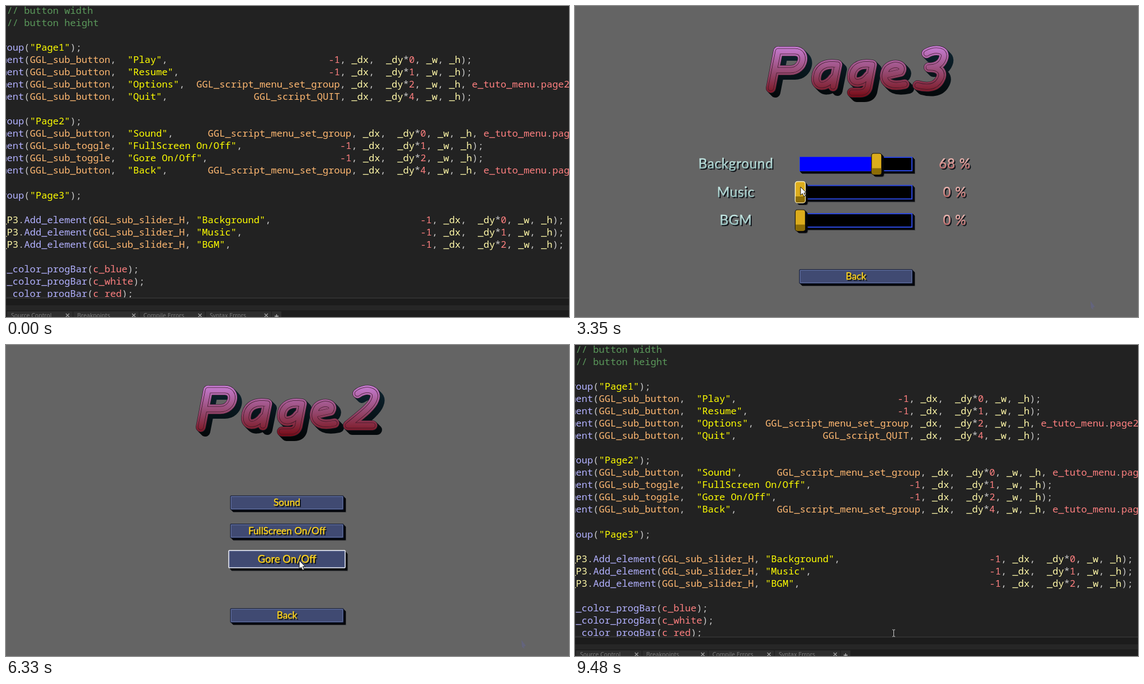
Recreate the animation shown at these times as an HTML page. Size 1006 by 557 pixels, loop 9.51 s.

```html
<!DOCTYPE html>
<html lang="en">
<head>
<meta charset="utf-8">
<title>Menu pages</title>
<style>
html, body { margin: 0; width: 100%; height: 100%; overflow: hidden; background: #646464; }
svg { display: block; width: 100vw; height: 100vh; }
text { white-space: pre; }
.code { font: 17.1px "Noto Sans Mono", monospace; }
.tab { font: 10.5px "Open Sans", sans-serif; fill: #808080; }
.button { font: 17.2px Lato, sans-serif; text-anchor: middle; stroke-width: .45px; }
.label { font: 24.3px Lato, sans-serif; text-anchor: middle; letter-spacing: .7px; stroke-width: .5px; }
.title { fill: none; stroke-linecap: round; stroke-linejoin: round; }
</style>
</head>
<body>
<svg id="stage" viewBox="0 0 1006 557" preserveAspectRatio="none">
  <defs>
    <linearGradient id="face" gradientUnits="userSpaceOnUse" x1="0" y1="72" x2="0" y2="164">
      <stop offset="0" stop-color="#c77dd4"/><stop offset=".5" stop-color="#964a72"/>
      <stop offset=".8" stop-color="#84263a"/><stop offset="1" stop-color="#780814"/>
    </linearGradient>
    <linearGradient id="depth" gradientUnits="userSpaceOnUse" x1="0" y1="72" x2="0" y2="164">
      <stop offset="0" stop-color="#0d2430"/><stop offset="1" stop-color="#030506"/>
    </linearGradient>
    <linearGradient id="teal" x1="0" y1="0" x2="0" y2="1">
      <stop offset=".2" stop-color="#c4e6e2"/><stop offset=".9" stop-color="#94bdbb"/>
    </linearGradient>
    <linearGradient id="rose" x1="0" y1="0" x2="0" y2="1">
      <stop offset=".2" stop-color="#f2bcb6"/><stop offset=".9" stop-color="#b86464"/>
    </linearGradient>
    <clipPath id="editor"><rect width="1006" height="522"/></clipPath>
  </defs>
</svg>
<script>
const LOOP = 9510, GAME_START = 290, GAME_END = 9070;
const CENTER = 502, TOP = 282.5, STEP = 50.5, WIDTH = 202, HEIGHT = 25, ZERO = 402;
const stage = document.getElementById('stage');

function make(tag, attrs, parent, text) {
  const node = document.createElementNS('http://www.w3.org/2000/svg', tag);
  set(node, attrs);
  if (text !== undefined) node.textContent = text;
  parent.append(node);
  return node;
}
function set(node, attrs) {
  for (const key in attrs) node.setAttribute(key, attrs[key]);
}
const show = (node, on) => node.style.display = on ? '' : 'none';
const clamp = (v, lo = 0, hi = 1) => Math.min(hi, Math.max(lo, v));

// Pointer route: time, x, y
const route = [
  [290, 600, 548], [1000, 512, 392], [1300, 510, 386], [1450, 510, 386],
  [1970, 481, 288], [2090, 480, 287], [2380, 402, 285], [2440, 402, 285],
  [2880, 539.3, 287], [2960, 539.3, 287], [3170, 490, 304], [3340, 403, 324],
  [3520, 403, 324], [3950, 606, 330], [4010, 606, 330], [4380, 403, 388],
  [4450, 403, 390], [4720, 493, 389], [4780, 493, 389], [5040, 524, 482],
  [5130, 526, 482], [5380, 535, 424], [5430, 535, 420], [5680, 530, 336],
  [5900, 530, 335], [6130, 526, 384], [6350, 524, 386], [6680, 512, 484],
  [6850, 512, 484], [7130, 512, 343], [7200, 511, 334], [7450, 506, 286],
  [7650, 506, 286], [7850, 510, 334], [8080, 522, 386], [8340, 523, 391],
  [8500, 494, 481], [9070, 494, 481]
];
function pointerAt(t) {
  const last = route.length - 1;
  if (t <= route[0][0]) return route[0].slice(1);
  if (t >= route[last][0]) return route[last].slice(1);
  const i = route.findIndex(k => k[0] > t);
  const [t0, x0, y0] = route[i - 1], [t1, x1, y1] = route[i];
  const p = (t - t0) / (t1 - t0), e = p * p * (3 - 2 * p);
  return [x0 + (x1 - x0) * e, y0 + (y1 - y0) * e];
}
function isOver(t, y) {
  const [px, py] = pointerAt(t);
  return t >= GAME_START && Math.abs(px - CENTER) < 101 && Math.abs(py - y) < 9.5;
}
// Hover strength builds and fades over a short window
function hoverAt(t, y) {
  let hits = 0;
  for (let i = 0; i < 24; i++) hits += isOver(t - i * 10, y);
  return clamp(hits / 24 * 2.2);
}

// Code editor
const gap = n => ' '.repeat(n);
const tail = (n, end = ');') => `_dx,  _dy*${n}, _w, _h${end}`;
const row = (kind, name, call, at, n, end) => {
  const head = `ment(GGL_sub_${kind},  "${name}",`;
  return head + gap(at + 1 - head.length) + call + ', ' + tail(n, end);
};
const slider = (name, n) => {
  const head = `_P3.Add_element(GGL_sub_slider_H, "${name}",`;
  return head + gap(73 - head.length) + '-1, ' + tail(n);
};
const jump = 'GGL_script_menu_set_group';
const lines = [
  ' // button width', ' // button height', '',
  'roup("Page1");',
  row('button', 'Play', '-1', 56, 0),
  row('button', 'Resume', '-1', 56, 1),
  row('button', 'Options', jump, 33, 2, ', e_tuto_menu.page2'),
  row('button', 'Quit', 'GGL_script_QUIT', 43, 4), '',
  'roup("Page2");',
  row('button', 'Sound', jump, 35, 0, ', e_tuto_menu.page3'),
  row('toggle', 'FullScreen On/Off', '-1', 58, 1),
  row('toggle', 'Gore On/Off', '-1', 58, 2),
  row('button', 'Back', jump, 35, 4, ', e_tuto_menu.page1'), '',
  'roup("Page3");', '',
  slider('Background', 0), slider('Music', 1), slider('BGM', 2), '',
  't_color_progBar(c_blue);', 't_color_progBar(c_white);', 't_color_progBar(c_red);'
];
const syntax = /(\/\/.*)|("[^"]*")|(GGL_\w+)|(e_tuto_menu|page\d|c_\w+|-?\d+)|(_\w+)|([A-Za-z]\w*)|[^\w"]/g;
const inks = ['#5b995b', '#ffff00', '#ffb871', '#ff8080', '#fff8a8', '#b2b1ff'];

const editor = make('g', {}, stage);
make('rect', { width: 1006, height: 557, fill: '#222222' }, editor);
const listing = make('g', { class: 'code', 'clip-path': 'url(#editor)' }, editor);
lines.forEach((line, i) => {
  const text = make('text', { x: -8.66, y: 13.5 + i * 22.07, fill: '#c8c8c8' }, listing);
  for (const m of line.matchAll(syntax)) {
    const kind = m.slice(1).findIndex(Boolean);
    make('tspan', kind < 0 ? {} : { fill: inks[kind] }, text, m[0]);
  }
});
make('rect', { y: 522, width: 1006, height: 2, fill: '#303030' }, editor);
make('rect', { y: 524, width: 1006, height: 12, fill: '#1c1c1c' }, editor);
make('rect', { y: 536, width: 1006, height: 21, fill: '#262626' }, editor);
make('rect', { y: 545, width: 1006, height: 12, fill: '#1e1e1e' }, editor);
['Source Control', 'Breakpoints', 'Compile Errors', 'Syntax Errors'].forEach((name, i) => {
  const x = 2 + i * 118.3;
  make('rect', { x, y: 547, width: 117, height: 10, fill: '#2e2e2e' }, editor);
  make('text', { x: x + 7, y: 558, class: 'tab' }, editor, name);
  make('path', { d: `M${x + 105} 551l6 6m0-6l-6 6`, stroke: '#a0a0a0', 'stroke-width': 1.3 }, editor);
});
make('rect', { x: 475, y: 547, width: 17, height: 10, fill: '#2e2e2e' }, editor);
make('path', { d: 'M480 555.5h7m-3.5-3.5v5', stroke: '#b8b8b8', 'stroke-width': 1.3 }, editor);
const beam = make('path', {
  d: 'M-2.5-6h2l.5.5.5-.5h2M0-5.5v11M-2.5 6h2l.5-.5.5.5h2', fill: 'none', stroke: '#d0d0d0'
}, editor);

// Game
const game = make('g', {}, stage);
make('rect', { width: 1006, height: 557, fill: '#646464' }, game);
make('path', { d: 'M921 528l8 11-4 1 2 4-5-3z', fill: '#62648a', opacity: .65 }, game);

const word = [
  'M361 81L348 147M361 81H391C413 81 407 115 383 115H357',
  'M466 105C441 101 430 113 429 129C428 147 449 145 460 128M467 105L459 144',
  'M528 105C502 101 494 114 493 125C492 141 512 139 522 125M529 105L521 146Q518 155 507 155H493',
  'M553 124L580 118C588 105 566 101 556 112C546 127 551 148 587 140'
].join('');
const digits = [
  'M612 96L636 81L622 148',
  'M628 87C641 76 666 79 658 98C653 112 630 128 611 144H655',
  'M626 85C640 77 663 77 656 95C652 106 641 110 630 110C651 109 657 121 650 132C642 147 624 146 610 142'
];
const shifts = [10, 0, 2];

function drawTitle(n, parent) {
  const g = make('g', { class: 'title', transform: `translate(${shifts[n]} 0)` }, parent);
  const layer = (stroke, width, off = 0) => make('path', {
    d: word + digits[n], stroke, 'stroke-width': width, transform: `translate(${off} ${off})`
  }, g);
  for (let off = 8; off > 0; off -= 2) layer('url(#depth)', 18, off);
  layer('#33202e', 18);
  layer('url(#face)', 16.5);
  layer('#3a1826', 10.5);
  layer('url(#face)', 9);
}

function shadowText(cls, fill, x, y, value, parent) {
  const back = make('text', { class: cls, x: x + 2, y: y + 2, fill: '#10141a', stroke: '#10141a' }, parent, value);
  const front = make('text', { class: cls, x, y, fill, stroke: fill }, parent, value);
  return v => { back.textContent = front.textContent = v; };
}
function extrude(x, y, w, h, rx, parent) {
  make('rect', { x: x + 5, y: y + 5, width: w, height: h, rx, fill: '#000', opacity: .3 }, parent);
  for (let i = 4; i > 0; i--) make('rect', { x: x + i, y: y + i, width: w, height: h, rx, fill: '#05070c' }, parent);
}

function addButton(page, name, index) {
  const y = TOP + index * STEP;
  const g = make('g', {}, page), body = make('g', {}, g), label = make('g', {}, g);
  extrude(-101, -12.5, WIDTH, HEIGHT, 1, body);
  const thin = 'vector-effect:non-scaling-stroke';
  const edge = make('rect', { x: -101, y: -12.5, width: WIDTH, height: HEIGHT, rx: 1, fill: '#404a72', style: thin }, body);
  const inner = make('rect', { x: -99.5, y: -11, width: WIDTH - 3, height: HEIGHT - 3, fill: 'none', stroke: '#6474a6', style: thin }, body);
  shadowText('button', '#fcd21e', 0, 5.7, name, label);
  return (t, scale) => {
    const h = hoverAt(t, y), grow = 6 * h, lit = isOver(t, y);
    set(g, { transform: `translate(${CENTER} ${y}) scale(${scale})` });
    set(body, { transform: `scale(${1 + grow / WIDTH} ${1 + grow / HEIGHT})` });
    set(label, { transform: `scale(${1 + .07 * h})` });
    set(edge, { stroke: lit ? '#f4f6ff' : '#141c36', 'stroke-width': lit ? 1.5 : 1 });
    set(inner, { 'stroke-opacity': lit ? .3 : 1 });
  };
}

function addSlider(page, name, index, color, from, to) {
  const y = TOP + index * STEP;
  const spot = () => make('g', {}, page);
  const label = spot(), bar = spot(), percent = spot();
  shadowText('label', 'url(#teal)', 0, 8.5, name, label);
  const setPercent = shadowText('label', 'url(#rose)', 0, 8.5, '0 %', percent);
  extrude(-101, -12.5, WIDTH, 26, 0, bar);
  make('rect', { x: -100, y: -11.5, width: 200, height: 24, fill: '#000', stroke: '#2a46dc', 'stroke-width': 2 }, bar);
  const fill = make('rect', { x: -100, y: -12, height: 25, fill: color }, bar);
  const knob = make('g', {}, bar);
  extrude(-9, -19, 18, 38, 4, knob);
  const shell = make('rect', { x: -9, y: -18.5, width: 18, height: 38, rx: 4, fill: '#dcac1c' }, knob);
  make('path', { d: 'M-8.4 8H8.4V15.5Q8.4 19 5 19H-5Q-8.4 19-8.4 15.5Z', fill: '#8c6c06' }, knob);
  return (t, scale) => {
    const value = clamp((pointerAt(clamp(t, from, to))[0] - ZERO) / WIDTH);
    const [px, py] = pointerAt(t);
    const x = value * WIDTH - 100.5;
    const lit = Math.abs(px - CENTER - x) < 10 && Math.abs(py - y) < 19;
    const place = (node, cx) => set(node, { transform: `translate(${cx} ${y}) scale(${scale})` });
    place(label, 287.5);
    place(bar, CENTER);
    place(percent, 678.5);
    set(fill, { width: value * 200 });
    set(knob, { transform: `translate(${x} 0)` });
    set(shell, { stroke: lit ? '#fff2c0' : '#1c1606', 'stroke-width': lit ? 1.4 : 1.2 });
    setPercent(Math.round(value * 100) + ' %');
  };
}

function buildPage(n, fill) {
  const root = make('g', {}, game);
  drawTitle(n, root);
  const items = make('g', {}, root);
  return { root, items, updates: fill(items) };
}
const buttons = names => page => names.map(([name, i]) => addButton(page, name, i));
const pages = [
  buildPage(0, buttons([['Play', 0], ['Resume', 1], ['Options', 2], ['Quit', 4]])),
  buildPage(1, buttons([['Sound', 0], ['FullScreen On/Off', 1], ['Gore On/Off', 2], ['Back', 4]])),
  buildPage(2, page => [
    addSlider(page, 'Background', 0, '#0000ff', 2440, 2880),
    addSlider(page, 'Music', 1, '#ffffff', 3520, 3950),
    addSlider(page, 'BGM', 2, '#ff0000', 4450, 4720),
    addButton(page, 'Back', 4)
  ])
];
const arrow = make('path', {
  d: 'M0 0V15L3.4 11.8 6 17.2 8.6 16 6.1 10.9H10.6Z', fill: '#fff', stroke: '#111', 'stroke-width': 1
}, game);

// Page visits: start time, page index
const visits = [[290, 0], [1300, 1], [2075, 2], [5080, 1], [6790, 0]];

function render(t) {
  const playing = t >= GAME_START && t < GAME_END;
  show(game, playing);
  show(editor, !playing);
  if (!playing) {
    show(beam, t >= GAME_END);
    const p = t < 9450 ? 0 : t < 9480 ? .45 : 1;
    set(beam, { transform: `translate(${497 + 72.5 * p} ${489 + 27 * p})` });
    return;
  }
  const [start, current] = visits.filter(v => v[0] <= t).pop();
  const p = clamp((t - start) / 350), scale = 1 - (1 - p) ** 3;
  pages.forEach((page, i) => show(page.root, i === current));
  const { items, updates } = pages[current];
  items.style.opacity = clamp(p * 3);
  items.style.filter = p < 1 ? `brightness(${.2 + .8 * p})` : 'none';
  updates.forEach(update => update(t, Math.max(scale, .01)));
  const [x, y] = pointerAt(t);
  set(arrow, { transform: `translate(${x} ${y})` });
}

const began = performance.now();
function tick() {
  render((performance.now() - began) % LOOP);
  requestAnimationFrame(tick);
}
tick();
</script>
</body>
</html>
```
